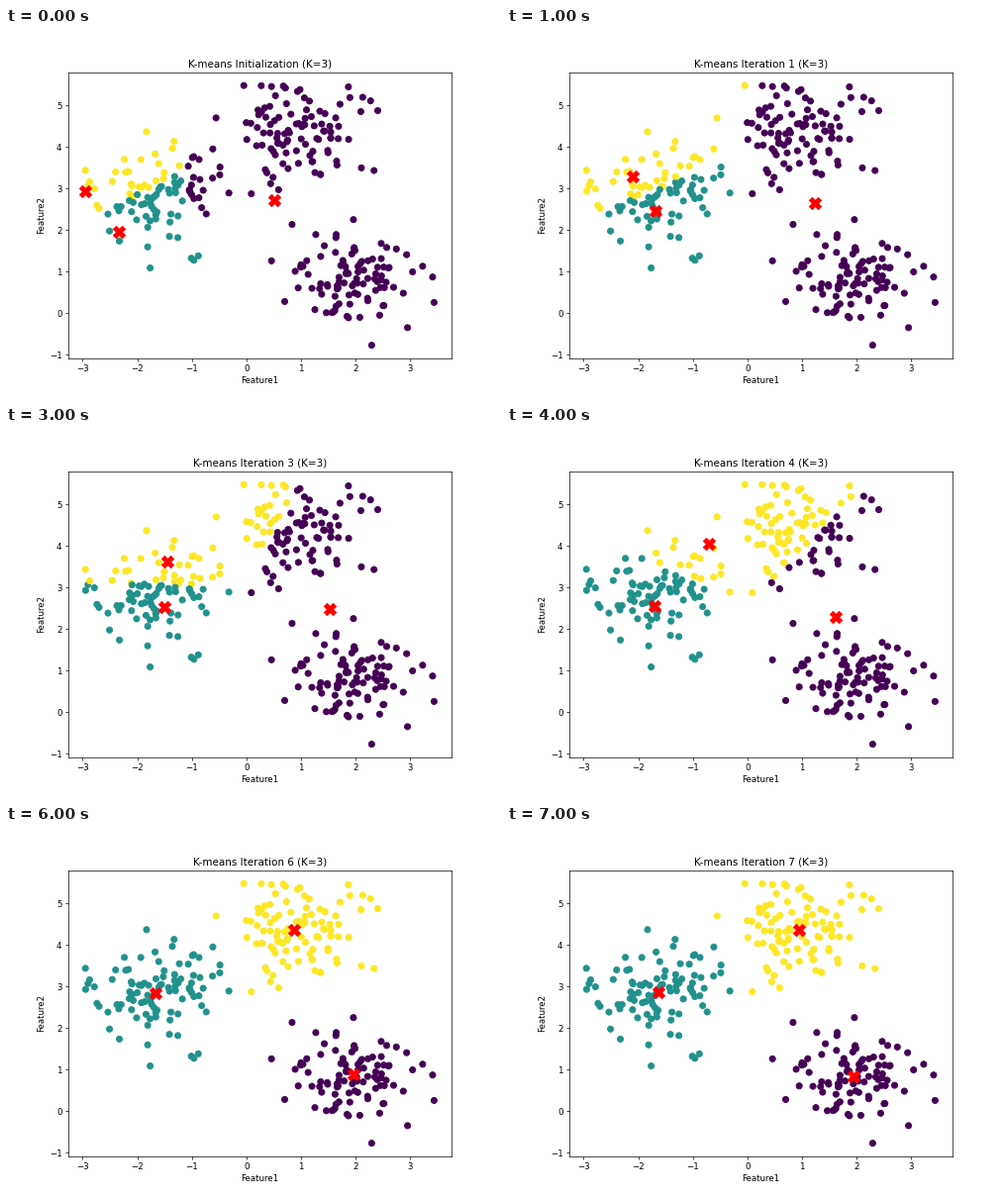
Animation of 500x375 px, one loop 8000 ms. Source, as a matplotlib script:

```python
import matplotlib.pyplot as plt
import numpy as np
from matplotlib.animation import FuncAnimation

K = 3
STEPS = 8
START = np.array([[0.52, 2.71], [-2.34, 1.97], [-2.95, 2.93]])


def make_blobs(count, spread, seed):
    """Equal Gaussian blobs around uniformly drawn centres, shuffled."""
    rng = np.random.RandomState(seed)
    centers = rng.uniform(-10, 10, (K, 2))
    points = np.vstack([rng.normal(c, spread, (count // K, 2)) for c in centers])
    order = np.arange(count)
    rng.shuffle(order)
    return points[order]


def assign(points, centroids):
    gaps = points[:, None] - centroids[None]
    return np.linalg.norm(gaps, axis=2).argmin(axis=1)


def run_kmeans(points, centroids):
    history = []
    for _ in range(STEPS):
        labels = assign(points, centroids)
        history.append((centroids, labels))
        centroids = np.array([points[labels == k].mean(axis=0) for k in range(K)])
    return history


points = make_blobs(300, 0.6, 0)
history = run_kmeans(points, START)

fig, ax = plt.subplots(figsize=(8, 6), dpi=62.5)
dots = ax.scatter(*points.T, c=history[0][1], cmap="viridis",
                  vmin=0, vmax=K - 1, s=50)
marks = ax.scatter(*START.T, c="red", marker="X", s=200)
ax.set_xlabel("Feature1")
ax.set_ylabel("Feature2")
title = ax.set_title("")


def update(step):
    centroids, labels = history[step]
    dots.set_array(labels)
    marks.set_offsets(centroids)
    stage = f"Iteration {step}" if step else "Initialization"
    title.set_text(f"K-means {stage} (K={K})")
    return dots, marks, title


anim = FuncAnimation(fig, update, frames=STEPS, interval=1000,
                     repeat=True, repeat_delay=0)
plt.show()
```
